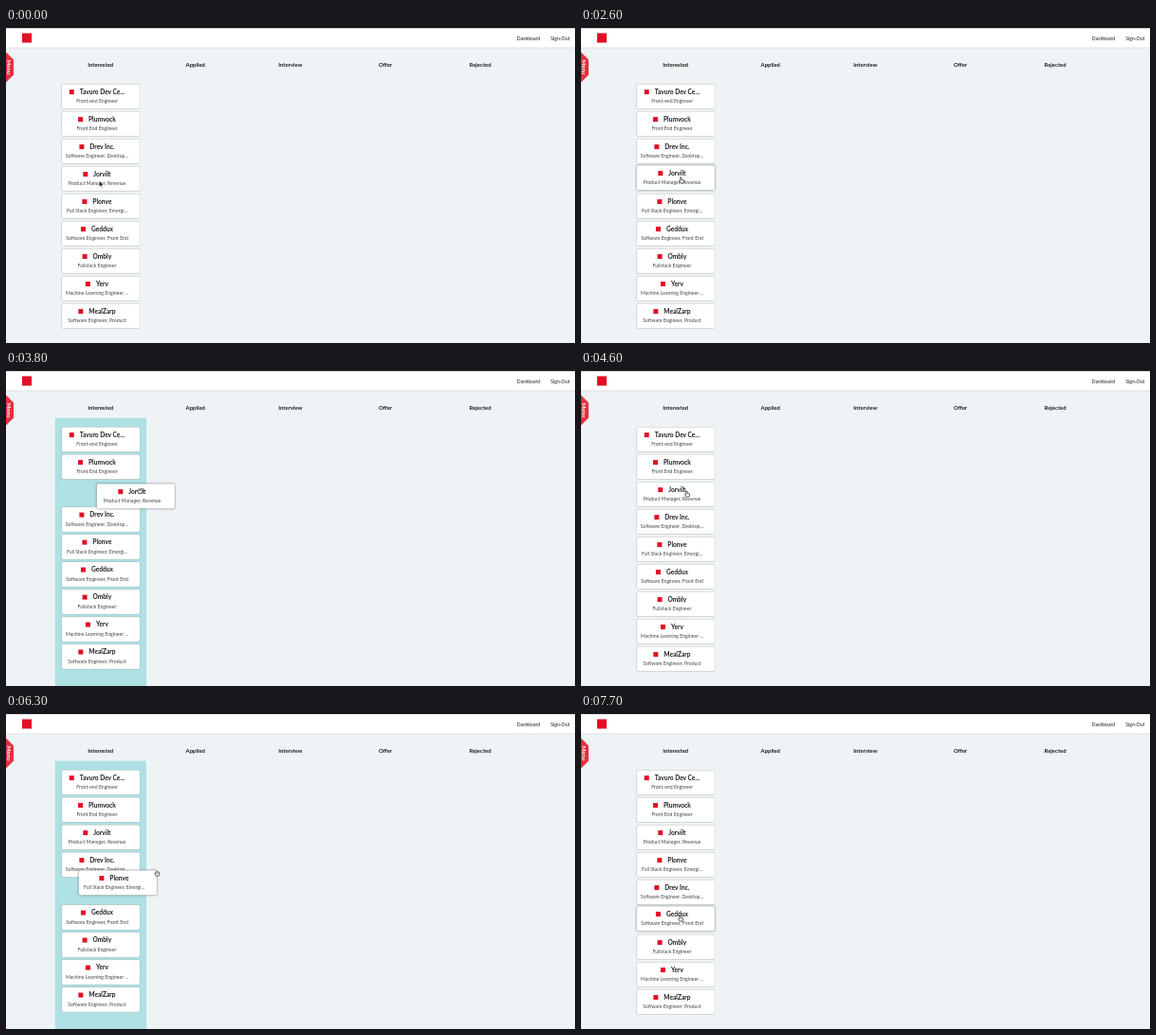
An HTML page for the animation above (8 s loop, 600 by 333 pixels).

```html
<!DOCTYPE html>
<html lang="en">
<head>
<meta charset="utf-8">
<title>Job board</title>
<style>
  html, body { margin: 0; height: 100%; overflow: hidden; background: #eef4f5; }
  svg { display: block; width: 600px; height: 333px; font-family: Lato, sans-serif; fill: #1b1c1d; }
  text { text-anchor: middle; }
  .head { font-size: 5.95px; font-weight: 700; }
  .nav { font-size: 5.1px; }
  .name { font-size: 6.6px; font-weight: 700; }
  .role { font-size: 5.15px; fill: #444; }
  .card { fill: #fff; stroke: #0002; stroke-width: .5; filter: drop-shadow(0 .6px .7px #0005); }
  .raised .card { filter: drop-shadow(0 .9px 1.2px #0007); }
  .red { fill: #e20f26; }
  #cursor path { stroke: #222; stroke-width: .7; stroke-linejoin: round; fill: #fff; }
</style>
</head>
<body>
<svg viewBox="0 0 600 333">
  <rect width="600" height="333" fill="#eef4f5"/>
  <rect width="600" height="21" fill="#fff"/>
  <path d="M0 .5H600M0 21H600" stroke="#d6dadc" stroke-width=".8"/>
  <rect class="red" x="17" y="5.5" width="10" height="10"/>
  <text class="nav" x="551" y="12.6">Dashboard</text>
  <text class="nav" x="584.3" y="12.6">Sign-Out</text>
  <rect id="column" x="51.7" y="49.5" width="96.3" height="284" fill="#aee0e4"/>
  <g id="heads"></g>
  <path d="M0 25.5L8 33.5V49.5L0 57.5Z" fill="#e62f40"/>
  <text class="head" transform="translate(1 41.5) rotate(90)" style="fill:#fff">Menu</text>
  <g id="cards"></g>
  <g id="cursor">
    <path id="arrow" d="M-1.5 -3.3V2.4L-.2 1.3L.8 3.4L1.6 3L.7 1H2.3Z" style="fill:#111;stroke:#fff;stroke-width:.3"/>
    <path id="hand" d="M-1.2 -3.2Q-.5 -3.8 -.1 -3V-.8L2.2 -.3Q2.8 0 2.6 1L2 3H-1L-2.6 .8Q-2.3 -.1 -1.2 .6Z"/>
    <path id="fist" d="M-2 -1.5Q-1 -2.6 0 -2Q2.3 -2.4 2.4 -.5Q2.6 1.4 1.6 2.4H-1.2Q-2.8 .6 -2 -1.5ZM-.8 -1V.1M.5 -1V.1"/>
  </g>
</svg>
<script>
const LOOP = 8000, FRAME = 100, SETTLE = 300;
const LEFT = 58.7, TOP = 59.3, STEP = 29, GAP = 26.5, WIDTH = 82.3, HEIGHT = 26.2;
const jobs = [
  ["Tavuro Dev Ce...", "Front-end Engineer"],
  ["Plumvock", "Front End Engineer"],
  ["Drev Inc.", "Software Engineer, Desktop..."],
  ["Jorvilt", "Product Manager, Revenue"],
  ["Plonve", "Full Stack Engineer, Emergi..."],
  ["Geddux", "Software Engineer, Front End"],
  ["Ombly", "Fullstack Engineer"],
  ["Yerv", "Machine Learning Engineer ..."],
  ["MealZarp", "Software Engineer, Product"]
];
// Each drag carries the card in one slot up to the slot above.
const drags = [{ slot: 3, lift: 3400, drop: 4200 }, { slot: 4, lift: 6100, drop: 6900 }];
// Cursor strokes: start, end, dx, dy.
const strokes = [
  [900, 1000, 0, -4], [1600, 1900, 6, 0],
  [3300, 3700, 37, -26], [3700, 3800, -2, -8], [3800, 4200, -29, 3],
  [5100, 5800, 17, 54],
  [6000, 6400, 36, -18], [6400, 6700, -60, -7], [6900, 7600, 0, 57]
];

const $ = id => document.getElementById(id);
const ramp = (t, start, length) => Math.min(1, Math.max(0, (t - start) / length));
const ease = k => k * k * (3 - 2 * k);
const slotY = slot => TOP + slot * STEP;
const move = (el, x, y) => el.setAttribute("transform", `translate(${x} ${y})`);

const cursorAt = t => strokes.reduce(([x, y], [start, end, dx, dy]) => {
  const k = ease(ramp(t, start, end - start));
  return [x + dx * k, y + dy * k];
}, [100, 165]);

// A carried card trails the cursor by one frame, then glides into its new slot.
function carried({ slot, lift, drop }, t) {
  const [x0, y0] = cursorAt(lift - FRAME);
  const [x, y] = cursorAt(Math.min(t, drop) - FRAME);
  const away = 1 - ease(ramp(t, drop, SETTLE));
  const home = slotY(slot - 1);
  return [LEFT + (x - x0) * away, home + (slotY(slot) - 1 + y - y0 - home) * away];
}

function add(parent, tag, attrs, text = "") {
  const el = document.createElementNS("http://www.w3.org/2000/svg", tag);
  for (const key in attrs) el.setAttribute(key, attrs[key]);
  el.textContent = text;
  return parent.appendChild(el);
}

["Interested", "Applied", "Interview", "Offer", "Rejected"].forEach((label, i) =>
  add($("heads"), "text", { class: "head", x: 99.7 + i * 100.1, y: 40.6 }, label));

const cards = jobs.map(([name, role]) => {
  const g = add($("cards"), "g", {});
  add(g, "rect", { class: "card", width: WIDTH, height: HEIGHT, rx: 1.4 });
  const title = add(g, "text", { class: "name", x: 42.7, y: 10.4 }, name);
  const x = 42.7 - title.getComputedTextLength() / 2 - 11;
  add(g, "rect", { class: "red", x, y: 5.8, width: 5, height: 5 });
  add(g, "text", { class: "role", x: 37.3, y: 19.9 }, role);
  return g;
});

function draw(t) {
  const order = [...cards];
  for (const { slot, drop } of drags)
    if (t >= drop + SETTLE) order.splice(slot - 1, 0, ...order.splice(slot, 1));
  const drag = drags.find(d => t >= d.lift && t < d.drop + SETTLE);
  const settling = drags.some(d => t >= d.lift && t <= d.drop + SETTLE + FRAME);
  const [cx, cy] = cursorAt(t);

  order.forEach((card, slot) => {
    let x = LEFT, y = slotY(slot);
    let raised = t >= 2400 && !settling && cy >= y && cy <= y + HEIGHT;
    if (raised) y -= 1;
    if (drag && slot === drag.slot) {
      [x, y] = carried(drag, t);
      raised = true;
      $("cards").append(card);
    } else if (drag && slot > drag.slot) {
      y -= STEP - GAP;
    } else if (drag && slot === drag.slot - 1) {
      y += GAP * ease(ramp(t, drag.lift + 200, 200));
    }
    move(card, x, y);
    card.classList.toggle("raised", raised);
  });

  $("column").style.opacity = drag ? ramp(t, drag.lift - FRAME, 200) : 0;

  const gripping = drags.some(d => t >= d.lift - FRAME && t < d.drop);
  const shape = t < 1600 ? "arrow" : gripping ? "fist" : "hand";
  for (const id of ["arrow", "hand", "fist"]) $(id).style.display = id === shape ? "" : "none";
  move($("cursor"), cx, cy);
}

function tick() {
  // The screen advances ten times a second.
  draw(Math.floor(performance.now() % LOOP / FRAME) * FRAME);
  requestAnimationFrame(tick);
}
tick();
</script>
</body>
</html>
```
